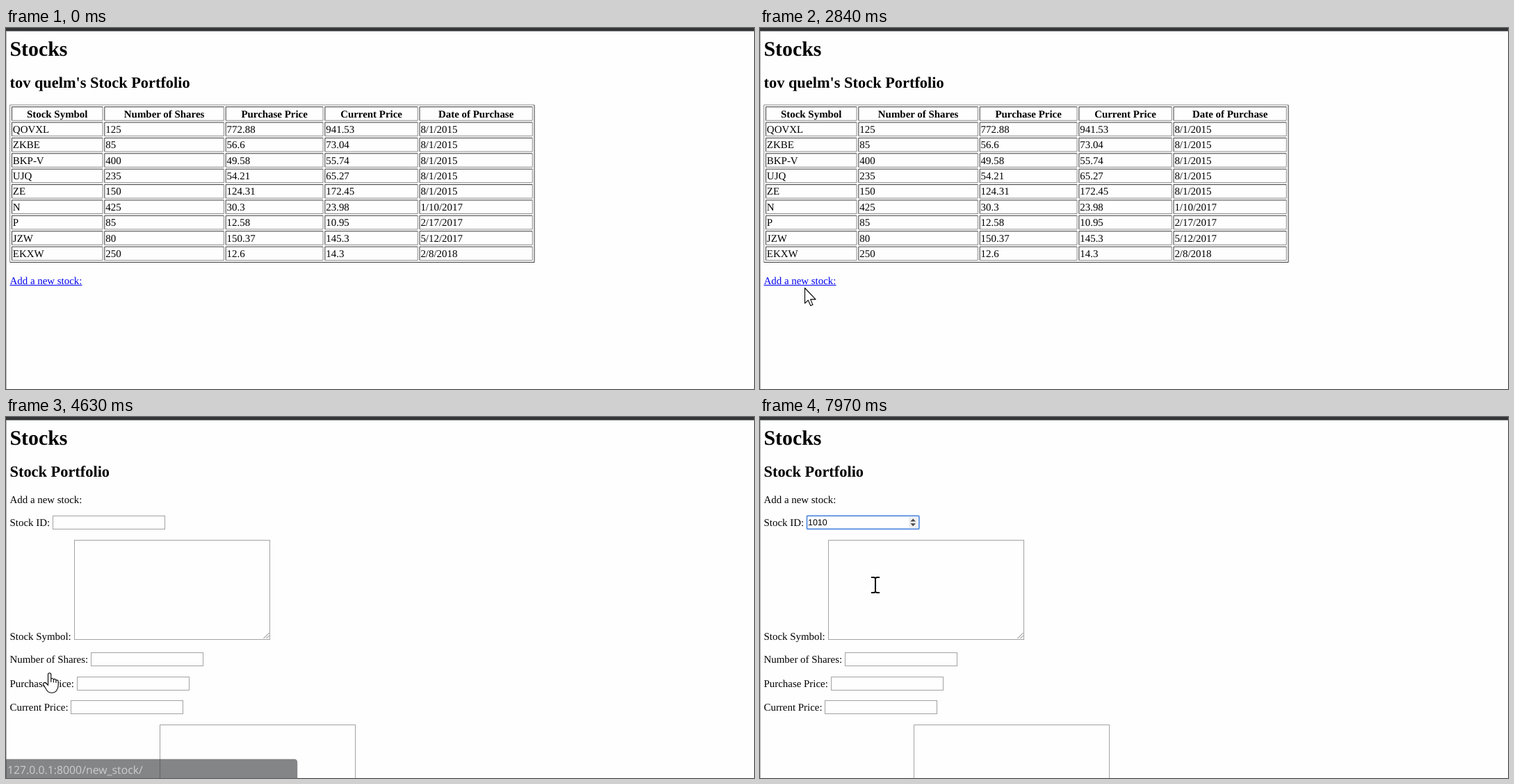
These frames come from a looping animation (1076 px wide and 520 px high, 8000 ms). An HTML page:

```html
<!DOCTYPE html>
<html lang="en">
<head>
<meta charset="utf-8">
<title>Stocks</title>
<style>
  html, body { margin: 0; width: 100%; height: 100%; overflow: hidden; background: #fefefe; }
  svg { display: block; }
  text { font: 14.92px "Liberation Serif", serif; text-rendering: geometricPrecision; white-space: pre; }
  .h1 { font-size: 29.84px; font-weight: bold; }
  .h2 { font-size: 22.38px; font-weight: bold; }
  .td, .th { font-size: 16px; }
  .th { font-weight: bold; text-anchor: middle; }
  .url { font: 15.8px "Open Sans", sans-serif; fill: #abaeb0; }
  .typed { font: 12.43px "Liberation Sans", sans-serif; }
  .line { fill: none; }
  .field { fill: none; shape-rendering: crispEdges; stroke: #a2a2a2; }
  .cursor { stroke: #000; stroke-width: 1.1; stroke-linejoin: round; fill: #fff; }
</style>
</head>
<body>
<svg id="stage" width="1076" height="520" viewBox="0 0 1076 520">
  <rect width="1076" height="4.6" fill="#323438"/>
  <rect y="5" width="1" height="515" fill="#b4b4b4"/>
  <text class="h1" x="5.5" y="39.7">Stocks</text>
  <g id="list"></g>
  <g id="form"></g>
  <g id="spinner">
    <rect x="214" y="144" width="13" height="16" fill="#f0f0f0"/>
    <path d="M216.3 150.5L220.2 146.5 224 150.5zM216.3 153.3L220.2 157.3 224 153.3z" fill="#484848"/>
  </g>
  <rect id="ring" x="67.5" y="142.3" width="161.3" height="19" rx="1" fill="none" stroke="#5189e0" stroke-width="1.7"/>
  <text id="typed" class="typed" x="69" y="156"></text>
  <rect id="caret" y="145" width="1" height="14"/>
  <g id="status">
    <path d="M0 492.8H414.5Q419.2 492.8 419.2 497.5V520H0z" fill="#323639"/>
    <text class="url" x="2" y="514">127.0.0.1:8000/new_stock/</text>
  </g>
  <circle id="halo" r="16.5" fill="#fbf000"/>
  <g id="cursor">
    <path id="arrow" class="cursor" d="M.5.5V22.5L5.3 18.2 8.8 26 12 24.6 8.6 16.9H16z"/>
    <path id="hand" class="cursor" d="M-.5 15V3Q-.5 .7 1.6 .7T3.8 3V9Q5.8 7.6 7.4 9.8 9.4 8.6 10.9 11 14.2 10.3 14.2 13.6V18Q14.2 22.5 12 25.5 9.8 29.3 5 29.3 0 29.3-2.2 25.8L-7 18Q-8 15.6-6 14.8-4.4 14.2-3 16L-.5 18.3zM3.8 9V14M7.4 10V14.5M10.9 11.2V15"/>
    <g id="beam" fill="none">
      <path d="M-6-11H-2L0-10 2-11H6M0-10V10M-6 11H-2L0 10 2 11H6" stroke="#000" stroke-width="2"/>
    </g>
  </g>
</svg>
<script>
const $ = id => document.getElementById(id);
const text = (s, x, y, cls = "") => `<text class="${cls}" x="${x}" y="${y}">${s}</text>`;
const box = (x, y, w, h) => `<rect class="field" x="${x + .5}" y="${y + .5}" width="${w}" height="${h}"/>`;
const bevel = (x, y, w, h, lead, trail) =>
  `<g class="line" transform="translate(${x + .5} ${y + .5})">` +
  `<path d="M0 ${h - 1}V0H${w - 1}" stroke="${lead}"/><path d="M0 ${h - 1}H${w - 1}V0" stroke="${trail}"/></g>`;

// Portfolio page; the table is laid out in page pixels and scaled to the stage
const dark = "#2c2c2c", gray = "#808080";
const columns = [3, 146, 333, 486, 632, 809];
const rows = `Stock Symbol,Number of Shares,Purchase Price,Current Price,Date of Purchase
QOVXL,125,772.88,941.53,8/1/2015
ZKBE,85,56.6,73.04,8/1/2015
BKP-V,400,49.58,55.74,8/1/2015
UJQ,235,54.21,65.27,8/1/2015
ZE,150,124.31,172.45,8/1/2015
N,425,30.3,23.98,1/10/2017
P,85,12.58,10.95,2/17/2017
JZW,80,150.37,145.3,5/12/2017
EKXW,250,12.6,14.3,2/8/2018`.split("\n").map(row => row.split(","));

let table = bevel(0, 0, 810, 244, gray, dark);
rows.forEach((row, r) => row.forEach((value, c) => {
  const left = columns[c], width = columns[c + 1] - left - 2, top = 3 + 24 * r;
  table += bevel(left, top, width, 22, dark, gray);
  table += r ? text(value, left + 2, top + 16.5, "td") : text(value, left + width / 2, top + 16.5, "th");
}));
$("list").innerHTML =
  text("tov quelm's Stock Portfolio", 5.5, 86.3, "h2") +
  `<g transform="translate(5.2 110.4) scale(.9325)">${table}</g>` +
  `<g id="link" fill="#00e">${text("Add a new stock:", 5.5, 368.8)}<rect x="5.5" y="370" width="104" height="1"/></g>`;

// Entry page
const field = (label, baseline, x, y) => text(label, 5.5, baseline) + box(x, y, 161, 19);
$("form").innerHTML =
  text("Stock Portfolio", 5.5, 86.3, "h2") +
  text("Add a new stock:", 5.5, 123.5) +
  field("Stock ID:", 156.5, 67, 142) +
  text("Stock Symbol:", 5.5, 321) + box(98, 177, 281, 143) +
  `<path d="M370.5 319L378.5 311M374.5 319L378.5 315" stroke="#777"/>` +
  field("Number of Shares:", 354, 122, 339) +
  field("Purchase Price:", 388.5, 102, 374) +
  field("Current Price:", 423, 93, 408) +
  box(221, 443, 281, 100);

// Pointer moves: start, end, steps, from, bend, to
const moves = [
  [350, 1110, 11, [912, 512], [400, 265], [20, 249]],
  [1200, 1990, 11, [20, 249], [90, 348], [163, 307]],
  [2040, 2840, 11, [163, 307], [168, 345], [64, 374]],
  [2910, 2990, 2, [64, 374], [62, 371], [61, 368]],
  [4940, 5330, 6, [61, 368], [70, 240], [87, 124]],
  [5490, 5570, 2, [87, 124], [90, 140], [92, 155]],
  [6040, 6040, 1, [92, 155], [100, 156], [112, 158]],
  [7970, 7970, 1, [112, 158], [140, 200], [166, 242]],
];
const keyTimes = [6590, 6820, 7190, 7440];

function pointerAt(t) {
  const move = moves.filter(m => t >= m[0]).pop();
  if (!move) return [0, 0];
  const [start, end, steps, from, bend, to] = move;
  const step = Math.min(steps, 1 + Math.floor((t - start) / (end - start || 1) * (steps - 1)));
  const p = step / steps, s = p * p * (3 - 2 * p), q = 1 - s;
  return from.map((v, i) => q * q * v + 2 * q * s * bend[i] + s * s * to[i]);
}

function statusOpacity(t) {
  if (t < 3070 || t >= 4790) return 0;
  if (t < 4630) return Math.min(1, (1 + Math.floor((t - 3070) / 77.5)) / 5);
  return t < 4710 ? .6 : .3;
}

function draw(t) {
  const show = (id, on) => $(id).setAttribute("visibility", on ? "visible" : "hidden");
  const within = (a, b) => t >= a && t < b;

  const onForm = t >= 4400;
  $("list").style.display = onForm ? "none" : "";
  $("form").style.display = onForm ? "" : "none";
  $("link").setAttribute("fill", within(4090, 4260) ? "#f00" : "#00e");
  $("status").setAttribute("opacity", statusOpacity(t));

  show("spinner", within(5252, 5330) || t >= 5490);
  show("ring", t >= 5730);
  const typed = keyTimes.filter(k => t >= k);
  $("typed").textContent = "1010".slice(0, typed.length);
  $("caret").setAttribute("x", 69 + Math.round(6.9 * typed.length));
  const lastInput = typed.length ? typed[typed.length - 1] : 5750;
  show("caret", t >= 5730 && t - lastInput < 530);

  const [x, y] = pointerAt(t);
  $("cursor").setAttribute("transform", `translate(${x} ${y})`);
  show("arrow", within(350, 2910) || within(4940, 5170));
  show("hand", within(2910, 4940));
  show("beam", t >= 5170);

  $("halo").setAttribute("cx", x - 1);
  $("halo").setAttribute("cy", y - .5);
  $("halo").setAttribute("opacity", within(4090, 4180) || within(5730, 5810) ? .7 : within(4180, 4260) ? .35 : 0);
}

const began = performance.now();
(function tick() {
  draw((performance.now() - began) % 8000);
  requestAnimationFrame(tick);
})();
</script>
</body>
</html>
```
